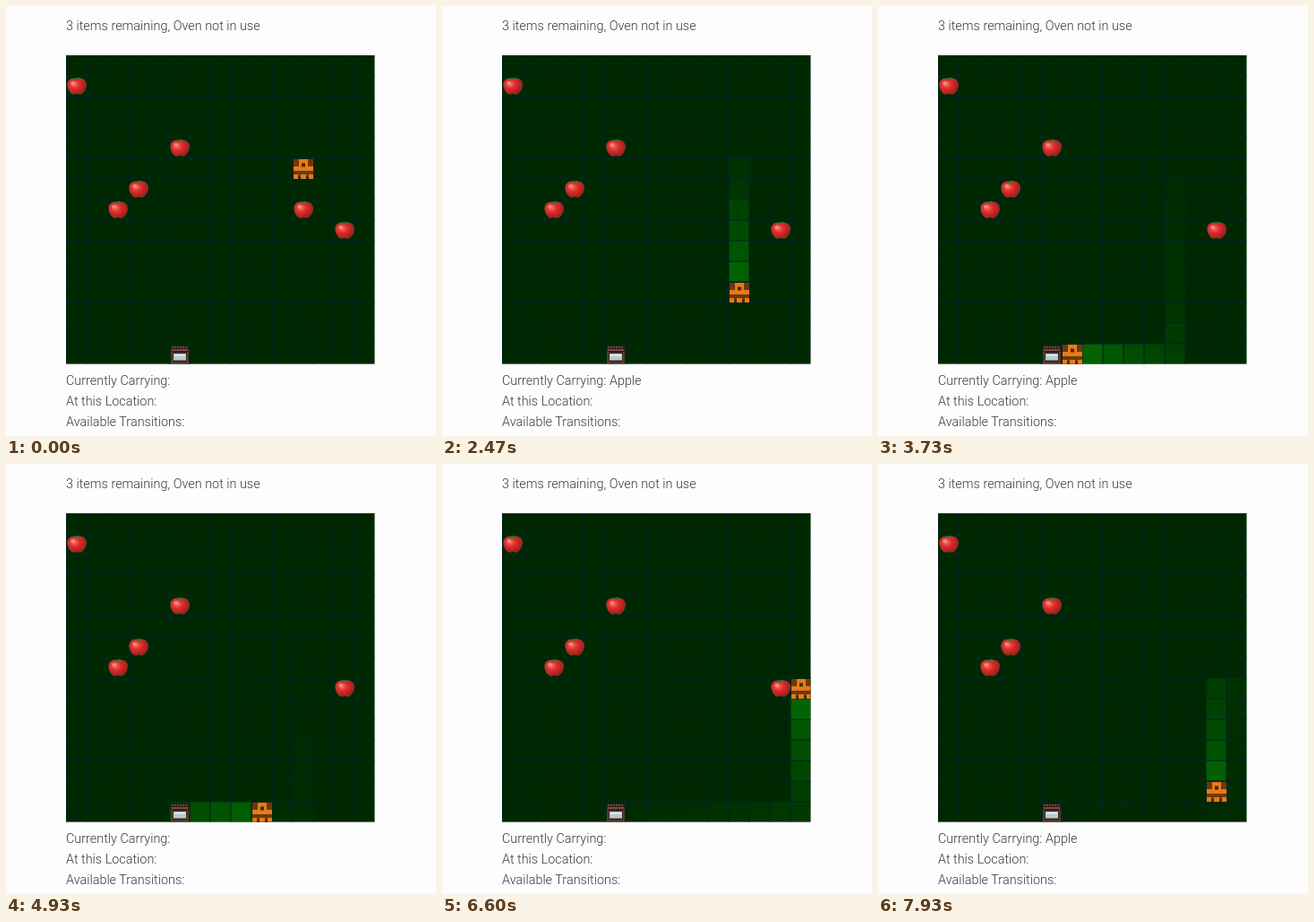
Write an HTML page that moves like this. It is 480x480 px and loops after 8 s.

```html
<!DOCTYPE html>
<html lang="en">
<head>
<meta charset="utf-8">
<title>Apple collector</title>
<style>
  html, body { margin: 0; width: 100%; height: 100%; overflow: hidden; background: #fdfdfd; }
  svg { display: block; width: 100vw; height: 100vh; }
  text { font: 300 14.42px Roboto, sans-serif; fill: #363b40; white-space: pre; }
</style>
</head>
<body>
<svg viewBox="0 0 480 480">
  <defs>
    <radialGradient id="skin" cx=".36" cy=".36" r=".68">
      <stop offset="0" stop-color="#f7766c"/>
      <stop offset=".4" stop-color="#de302d"/>
      <stop offset="1" stop-color="#a5191a"/>
    </radialGradient>
    <g id="apple">
      <path d="M12 4C9 2 1.8 3 1.8 9.6C1.8 14.6 5 20.3 8.6 20.3C10 20.3 10.8 19.6 12 19.6C13.2 19.6 14 20.3 15.4 20.3C19 20.3 22.4 14.6 22.4 9.6C22.4 3 15 2 12 4Z" fill="url(#skin)" stroke="#8f4a2c" stroke-width=".8"/>
      <path d="M8.5 3.4Q10.5 1.6 12 2.8Q13.5 .8 15.4 2.8Q14 4.8 12 4.6Q10 5 8.5 3.4Z" fill="#3c7426"/>
      <ellipse cx="7.6" cy="8" rx="2.4" ry="2" fill="#ffa79b" opacity=".6"/>
    </g>
    <g id="oven">
      <rect x="2" y="2" width="20" height="20.5" fill="#2c1b17"/>
      <path d="M3 3.8H21" stroke="#80665f" stroke-width="1.2" stroke-dasharray="2 1"/>
      <path d="M2.5 7H21.5" stroke="#9c5746" stroke-width="1.4"/>
      <path d="M3 9V22H21V9" fill="#3b2924" stroke="#84503f"/>
      <rect x="5" y="11" width="14" height="7.5" fill="#b4cbd1"/>
      <path d="M6 13H18" stroke="#e3f0f2" stroke-width="1.5"/>
    </g>
    <g id="robot">
      <path d="M1 1H23V23H1Z" fill="#6f380b"/>
      <path d="M7 1H17V9H23V14H1V9H7ZM1 18H6V23H1ZM9 18H15V23H9ZM18 18H23V23H18Z" fill="#e67b17"/>
      <path d="M10 5.5H14V9.5H10ZM6 20H9V23H6ZM15 20H18V23H15Z" fill="#4a2808"/>
    </g>
    <clipPath id="board"><rect x="67" y="55" width="344.4" height="344.4"/></clipPath>
  </defs>
  <g clip-path="url(#board)">
    <rect x="67" y="55" width="345" height="345" fill="#002800"/>
    <path id="grid" fill="none" stroke="#00242f"/>
    <g id="trail" fill="#006600"></g>
    <g id="items"></g>
    <use id="bot" href="#robot"/>
  </g>
  <text x="67" y="27">3 items remaining, Oven not in use</text>
  <text id="carry" x="67" y="423"></text>
  <text id="place" x="67" y="446"></text>
  <text id="options" x="67" y="468.5"></text>
</svg>
<script>
const LOOP = 8000, STEP = 160, CELL = 23, SIZE = 15, FADE = 650;
const $ = id => document.getElementById(id);
const px = c => 67 + c * CELL;
const py = r => 55 + r * CELL;

function add(parent, tag, attrs) {
  const el = document.createElementNS('http://www.w3.org/2000/svg', tag);
  for (const k in attrs) el.setAttribute(k, attrs[k]);
  return parent.appendChild(el);
}

const sprite = (name, c, r) =>
  add($('items'), 'use', { href: '#' + name, x: px(c), y: py(r) });

let lines = '';
for (let i = 0; i <= SIZE; i++) {
  lines += `M${px(i)} 55V400M67 ${py(i)}H412`;
}
$('grid').setAttribute('d', lines);

[[0, 1], [5, 4], [3, 6], [2, 7]].forEach(([c, r]) => sprite('apple', c, r));
const firstApple = sprite('apple', 11, 7);
const secondApple = sprite('apple', 13, 8);
sprite('oven', 5, 14);

// Each visit is a cell and the time the robot enters it.
const visits = [{ t: 0, c: 11, r: 5 }];
function go(t, dc, dr, count) {
  for (let i = 0; i < count; i++) {
    const { c, r } = visits[visits.length - 1];
    visits.push({ t: t + i * STEP, c: c + dc, r: r + dr });
  }
}
go(1230, 0, 1, 2);
go(1950, 0, 1, 7);
go(3070, -1, 0, 6);
go(4350, 1, 0, 9);
go(5790, 0, -1, 6);
go(6750, -1, 0, 1);
go(7230, 0, 1, 5);

const trail = visits.slice(0, -1).map((v, i) => ({
  left: visits[i + 1].t,
  el: add($('trail'), 'rect', { x: px(v.c) + .6, y: py(v.r) + .6, width: 21.8, height: 21.8 })
}));

const PICK_1 = 1710, DROP = 4190, PICK_2 = 6990;
const within = (t, a, b) => t >= a && t < b;
const show = (el, on) => el.setAttribute('visibility', on ? 'visible' : 'hidden');

function setText(id, s) {
  if ($(id).textContent !== s) $(id).textContent = s;
}

function draw(t) {
  const { c, r } = visits.filter(v => v.t <= t).pop();
  $('bot').setAttribute('x', px(c));
  $('bot').setAttribute('y', py(r));

  for (const { left, el } of trail) {
    el.setAttribute('opacity', t < left ? 0 : Math.exp((left - t) / FADE).toFixed(3));
  }

  show(firstApple, t < 1390);
  show(secondApple, t < 6750);

  const carrying = within(t, PICK_1, DROP) || t >= PICK_2;
  const onApple = within(t, 1390, PICK_1) || within(t, 6750, PICK_2);
  const onOven = within(t, 3870, 4350);
  setText('carry', 'Currently Carrying: ' + (carrying ? 'Apple' : ''));
  setText('place', 'At this Location: ' + (onApple ? 'Apple' : onOven ? 'Oven' : ''));
  setText('options', 'Available Transitions: ' +
    (within(t, 3870, DROP) ? 'Put Apple in Oven, Leave Apple Here' : ''));
}

const start = performance.now();
function tick() {
  draw((performance.now() - start) % LOOP);
  requestAnimationFrame(tick);
}
tick();
</script>
</body>
</html>
```
